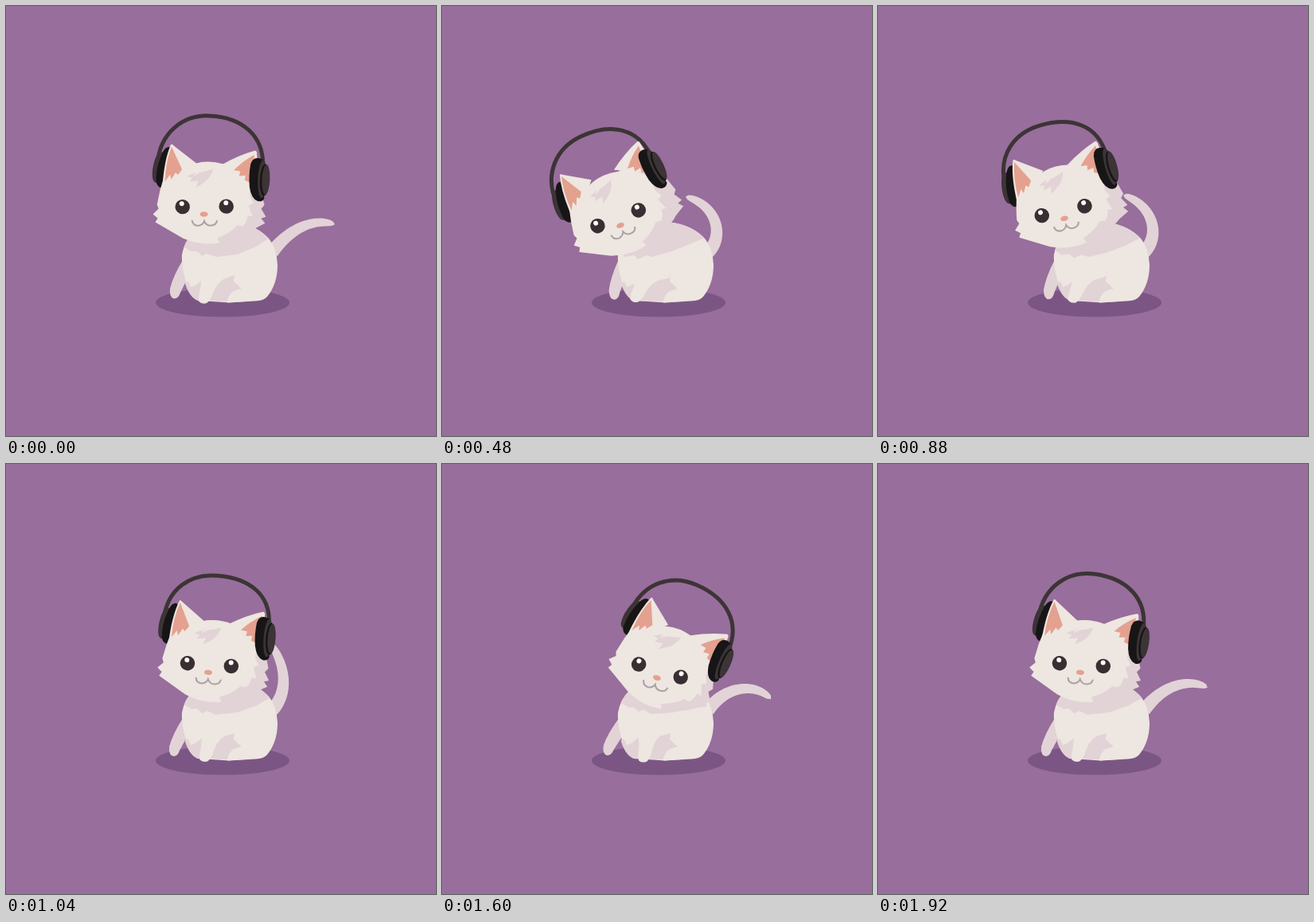
Write an HTML page that moves like this. It is 540 px wide and 540 px high and loops after 1.96 s.

```html
<!DOCTYPE html>
<html lang="en">
<head>
<meta charset="utf-8">
<title>Cat with headphones</title>
<style>
  html, body { margin: 0; width: 100%; height: 100%; overflow: hidden; background: #986e9c; }
  svg { display: block; width: 100vw; height: 100vh; }
  .cream { fill: #eee6e0; }
  .shade { fill: #e2d3d7; }
  .pink { fill: #e4a18f; }
  .black { fill: #171516; }
  .grey { fill: #3c3436; }
  .eye { fill: #392e32; }
</style>
</head>
<body>
<svg viewBox="0 0 540 540">
  <defs>
    <path id="torso" d="M236 284Q224 295 221 312Q220 325 225 343Q229 364 241 370L280 372.500L313 370.500Q324 370 328 365Q341 349 341 325Q340 304 330 292Q315 276 290 272Z"/>
    <clipPath id="inTorso"><use href="#torso"/></clipPath>
  </defs>
  <ellipse cx="272" cy="372.500" rx="84" ry="18" fill="#7b5684"/>
  <path id="tail" class="shade"/>

  <path id="sideLeg" class="shade" d="M222 319Q210 339 206 355Q205 367 212 367.500Q217 367 219 360L228 342L234 325Z"/>
  <use href="#torso" class="cream"/>
  <path class="shade" d="M224.500 347L229 346L232 353L239 350L247 343L270 343L287 338L286 346L296 355L286 358Q279 362 278 371L241 370Q230 366 224.500 347Z"/>
  <path id="frontLeg" class="cream" d="M240 322Q247 339 244 355Q241 366 242 371Q246 375 252 373Q257 369 260 360Q264 349 273 343L288 337L285 322Z"/>
  <path class="cream" d="M278 372.500Q279 365 287 362L300 358V371Z"/>
  <path id="neck" class="shade" clip-path="url(#inTorso)"/>

  <g id="phonesBack">
    <path id="band" fill="none" stroke="#3c3436" stroke-width="5"/>
    <path class="grey" d="M191 186Q184 187 181.500 207Q180 225 187 225L195 187Z"/>
    <path class="black" d="M203 180Q198 177 193 186Q185 205 186.500 224Q189 232 196 231L206 215Z"/>
  </g>
  <g id="skull">
    <path id="jaw" class="shade" d="M271 198Q308 208 319 232L324 249L320 254L326 264L320 266L325 272L312 279Q292 296 248 300L230 220Z"/>
    <path class="cream" d="M236 198Q253 193 271 198Q297 204 306 224L305 238L310 247L304 250L309 264L303 263Q302 272 297 276L290 275Q282 285 265 291L268 297Q246 302 222 292L187 272L190 267L184 262L191 255L189 250Q192 231 198 213Z"/>
    <path class="shade" d="M226 214L237 209L234 214L243 209Q250 208 259 204Q256 219 238 227.500L241 219L230 221L233 216Z"/>
  </g>
  <g id="ears">
    <path class="cream" d="M204 175Q205 174 208 177L237 198L225 211L195 229Q196 195 204 175Z"/>
    <path class="pink" d="M205 178Q198 197 198 222L204 213L206 219L211 210L214 213L219 206Z"/>
    <path class="cream" d="M310 179.500Q289 186 268 199L290 212L310 222L314 200L312 181Z"/>
    <path class="pink" d="M309 185Q295 193 284 205L292 206L291 212L299 211L298 217L308 221Z"/>
  </g>
  <g id="face">
    <circle class="eye" cx="221" cy="252.300" r="9.200"/>
    <circle class="eye" cx="276" cy="251.300" r="9.200"/>
    <circle cx="220" cy="248.300" r="3" fill="#fff"/>
    <circle cx="275.500" cy="247" r="3" fill="#fff"/>
    <ellipse class="pink" cx="248" cy="261.500" rx="5" ry="3.200"/>
    <path d="M233 269Q234 276 241 276Q247 275 248.500 270Q251 276 257 275.500Q264 275 264.500 269" fill="none" stroke="#aaa1a4" stroke-width="2"/>
  </g>
  <g id="phonesFront">
    <path class="black" d="M304 196Q306 187 314 188L320 190L323 238Q321 243 315 242Q307 240 304 225Q302 210 304 196Z"/>
    <ellipse class="grey" cx="319.500" cy="214" rx="5.500" ry="24"/>
    <ellipse class="black" cx="322.500" cy="215" rx="6" ry="20"/>
    <ellipse class="grey" cx="324" cy="214.500" rx="5" ry="18.700"/>
  </g>
</svg>
<script>
const LOOP = 1960, HALF = LOOP / 2, STEP = 40, RAD = Math.PI / 180;
const EYES = [248.5, 251.5];
const el = id => document.getElementById(id);

// Lower edge of the neck shadow for a head leaning left, upright and right.
const NECK = {
  left:   [[219, 306], [230, 315], [241, 313], [246, 318], [257, 313], [264, 315], [285, 309], [309, 300], [330, 291]],
  middle: [[219, 300], [232, 308], [240, 308], [246, 314], [252, 311], [264, 315], [290, 312], [312, 303], [331, 291]],
  right:  [[219, 297], [235, 306], [240, 305], [247, 311], [253, 308], [262, 314], [290, 312], [320, 305], [341, 296]]
};

// Cubic ease with control points (2/3, 0) and (1/3, 1).
function ease(x) {
  let s = x;
  for (let i = 0; i < 8; i++) {
    s -= (2 * s - 3 * s * s + 2 * s * s * s - x) / (2 - 6 * s + 6 * s * s);
  }
  return s * s * (3 - 2 * s);
}

// Swings from one value to the other and back; `start` is when `from` is reached.
function swing(t, start, from, to) {
  const phase = (t - start + 2 * LOOP) % LOOP / HALF;
  return from + (to - from) * ease(phase < 1 ? phase : 2 - phase);
}

const lean = t => swing(t, 500, -20, 18.6);

const polygon = points =>
  "M" + points.map(p => p.map(n => n.toFixed(2)).join(" ")).join("L") + "Z";

function tailPath(tip) {
  const count = 30, length = 92, upper = [], lower = [];
  let x = 334, y = 309;
  for (let i = 0; i <= count; i++) {
    const s = i / count;
    const angle = (51.5 - 33 * s - 40.5 * s * s + (1.29 * s - 0.04) * tip) * RAD;
    const dx = Math.cos(angle), dy = -Math.sin(angle);
    const w = (8.5 - 4 * s) * Math.sqrt(1 - s ** 14);
    upper.push([x + dy * w, y - dx * w]);
    lower.unshift([x - dy * w, y + dx * w]);
    x += dx * length / count;
    y += dy * length / count;
  }
  return polygon(upper.concat(lower));
}

function neckPath(p) {
  const side = p < 0 ? NECK.left : NECK.right;
  const amount = Math.min(1, Math.abs(p) / 17);
  const edge = NECK.middle.map((point, i) =>
    point.map((n, k) => n + (side[i][k] - n) * amount));
  return polygon([...edge, [350, 270], [290, 260], [219, 270]]);
}

function draw(t) {
  const p = lean(t);
  const dx = 80.5 * Math.sin(p * RAD), dy = 0.03 * (p - 2) ** 2;
  const turn = (id, angle, lift = 0) => el(id).setAttribute("transform",
    `translate(${dx} ${dy - lift}) rotate(${angle} ${EYES})`);

  turn("face", p);
  turn("skull", 1.15 * p, 0.06 * Math.max(0, p));
  el("jaw").setAttribute("transform", `translate(${-0.25 * p} ${0.1 * p})`);
  turn("ears", 1.28 * lean(t - 8), 0.011 * p * p);
  const phones = 1.28 * lean(t - 14), phoneLift = 0.25 * Math.max(0, p);
  turn("phonesBack", phones, phoneLift);
  turn("phonesFront", phones, phoneLift);

  const top = 139.3 - 1.5 * Math.cos(2 * Math.PI * t / LOOP);
  el("band").setAttribute("d",
    `M187 202C188 161 217 ${top} 250 ${top}C290 ${top} 320 159 319.500 200`);

  el("sideLeg").setAttribute("transform", `rotate(${0.33 * p} 225 325)`);
  el("frontLeg").setAttribute("transform", `rotate(${-0.4 * p} 258 330)`);
  el("neck").setAttribute("d", neckPath(p));
  el("tail").setAttribute("d", tailPath(swing(t, 660, 158, -23)));
}

function tick() {
  const t = performance.now() % LOOP;
  draw(Math.floor(t / STEP) * STEP);
  requestAnimationFrame(tick);
}
tick();
</script>
</body>
</html>
```
